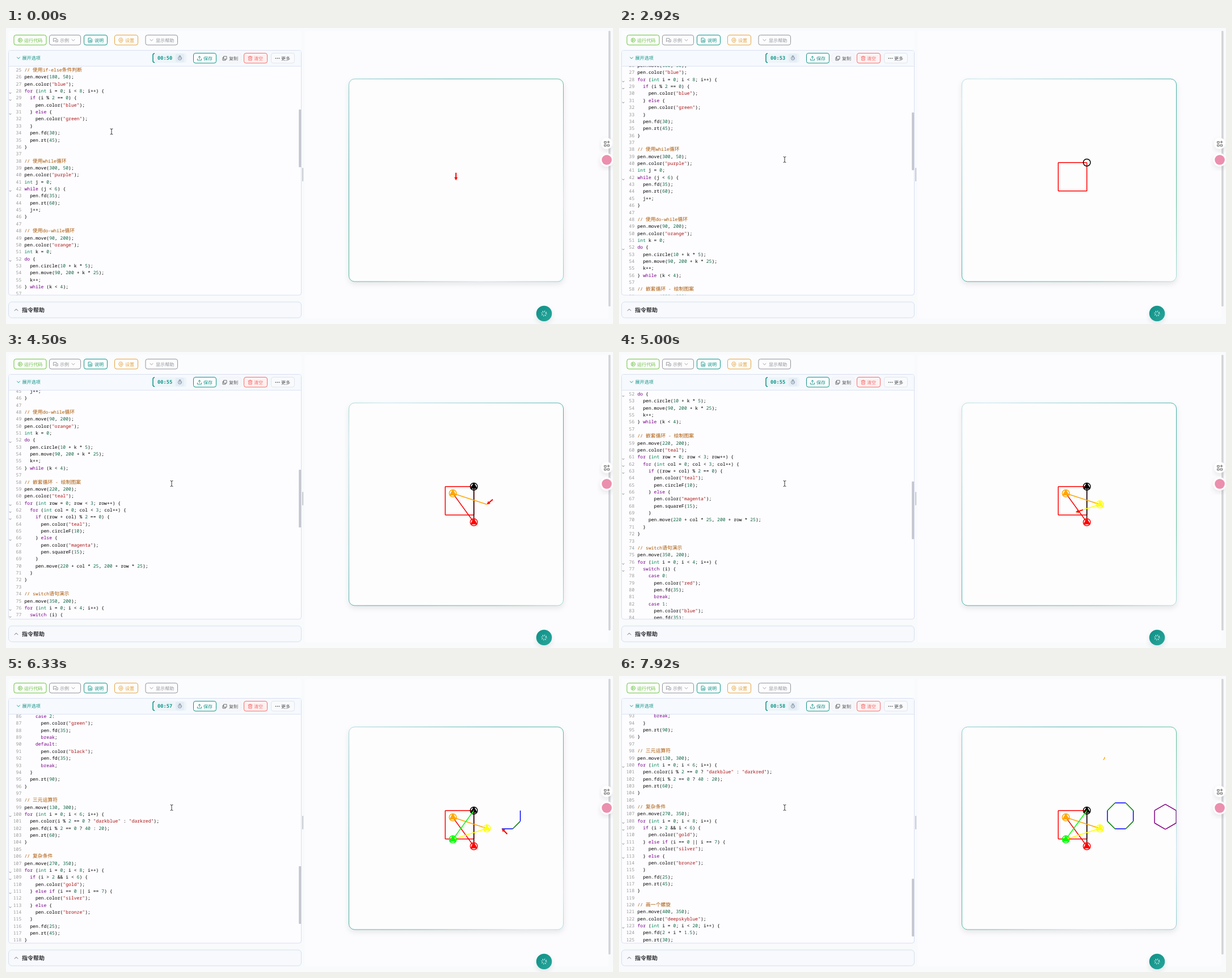
These frames come from a looping animation (1070 px wide and 523 px high, 8000 ms). An HTML page:

```html
<!DOCTYPE html>
<html lang="zh-CN">
<head>
<meta charset="utf-8">
<style>
html, body { margin: 0; height: 100%; overflow: hidden; background: #f8fafc; }
svg { display: block; font: 500 8.1px "Noto Sans CJK SC", "Noto Sans CJK", sans-serif; text-rendering: geometricPrecision; }
.code text { font: 8.08px "Noto Sans Mono", monospace; white-space: pre; }
.code .cjk { font: 8.8px "Noto Sans CJK SC", "Noto Sans CJK", sans-serif; }
.comment { fill: #a50; } .string { fill: #a11; } .keyword { fill: #708; } .type { fill: #085; } .number { fill: #164; }
.icon { fill: none; stroke-width: .9; stroke-linecap: round; stroke-linejoin: round; }
</style>
</head>
<body>
<script>
const LOOP = 8000, LINE = 12.355, FIRST = 25;
const TEAL = '#0d9488', GREEN = '#67c23a', GREY = '#909399';

const source = `// 使用if-else条件判断
pen.move(180, 50);
pen.color("blue");
for (int i = 0; i < 8; i++) {
  if (i % 2 == 0) {
    pen.color("blue");
  } else {
    pen.color("green");
  }
  pen.fd(30);
  pen.rt(45);
}

// 使用while循环
pen.move(300, 50);
pen.color("purple");
int j = 0;
while (j < 6) {
  pen.fd(35);
  pen.rt(60);
  j++;
}

// 使用do-while循环
pen.move(90, 200);
pen.color("orange");
int k = 0;
do {
  pen.circle(10 + k * 5);
  pen.move(90, 200 + k * 25);
  k++;
} while (k < 4);

// 嵌套循环 - 绘制图案
pen.move(220, 200);
pen.color("teal");
for (int row = 0; row < 3; row++) {
  for (int col = 0; col < 3; col++) {
    if ((row + col) % 2 == 0) {
      pen.color("teal");
      pen.circleF(10);
    } else {
      pen.color("magenta");
      pen.squareF(15);
    }
    pen.move(220 + col * 25, 200 + row * 25);
  }
}

// switch语句演示
pen.move(350, 200);
for (int i = 0; i < 4; i++) {
  switch (i) {
    case 0:
      pen.color("red");
      pen.fd(35);
      break;
    case 1:
      pen.color("blue");
      pen.fd(35);
      break;
    case 2:
      pen.color("green");
      pen.fd(35);
      break;
    default:
      pen.color("black");
      pen.fd(35);
      break;
  }
  pen.rt(90);
}

// 三元运算符
pen.move(130, 300);
for (int i = 0; i < 6; i++) {
  pen.color(i % 2 == 0 ? "darkblue" : "darkred");
  pen.fd(i % 2 == 0 ? 40 : 20);
  pen.rt(60);
}

// 复杂条件
pen.move(270, 350);
for (int i = 0; i < 8; i++) {
  if (i > 2 && i < 6) {
    pen.color("gold");
  } else if (i == 0 || i == 7) {
    pen.color("silver");
  } else {
    pen.color("bronze");
  }
  pen.fd(25);
  pen.rt(45);
}

// 画一个螺旋
pen.move(400, 350);
pen.color("deepskyblue");
for (int i = 0; i < 20; i++) {
  pen.fd(2 + i * 1.5);
  pen.rt(30);
}

`.split('\n');

const escapeXml = s => s.replace(/&/g, '&amp;').replace(/</g, '&lt;');
const TOKEN = /(?<comment>\/\/.*)|(?<string>"[^"]*")|(?<keyword>\b(?:for|if|else|while|do|switch|case|break|default)\b)|(?<type>\bint\b)|(?<number>\d+(?:\.\d+)?)/g;
const highlight = line => escapeXml(line).replace(TOKEN, (token, ...rest) => {
  const groups = rest.at(-1);
  const kind = Object.keys(groups).find(name => groups[name]);
  const body = token.replace(/[\u4e00-\u9fff]+/g, run => `<tspan class="cjk">${run}</tspan>`);
  return `<tspan class="${kind}">${body}</tspan>`;
});

const DOWN = 'M-2.5-1.2L0 1.2 2.5-1.2';
const CIRCLE = r => `M${r} 0A${r} ${r} 0 1 1-${r} 0A${r} ${r} 0 1 1 ${r} 0z`;
const ICON = {
  play: CIRCLE(3.6) + 'M-1-1.6L1.7 0-1 1.6z',
  chat: 'M-3.6-3.2h5v4.2h-3l-2 1.3zM3-1h.8v4h-4.2',
  doc: 'M-3-3.6h4l2 2v5.2h-6zM-1.4 0h2.8M-1.4 1.8h2.8',
  gear: 'M-1.7-3.6h3.4L3.7 0 1.7 3.6h-3.4L-3.7 0z' + CIRCLE(1.3),
  upload: 'M0 1V-3.5M-2-1.6L0-3.6 2-1.6M-3.6 1v2.4h7.2V1',
  copy: 'M-1.5-3.4h5v5h-5zM-1.5-1.4h-2v5h5v-2',
  trash: 'M-3.5-2.4h7M-1.2-2.4v-1.2h2.4v1.2M-2.7-2.4v6h5.4v-6M-.9-.4v2M.9-.4v2',
  watch: CIRCLE(3) + 'M0-1.3V.4M-1.2-4.2h2.4',
};
const icon = (d, x, y, color, extra = '') =>
  `<path class="icon" d="${d}" transform="translate(${x} ${y})" stroke="${color}" ${extra}/>`;
const label = (s, x, y, color, extra = '') => `<text x="${x}" y="${y}" fill="${color}" ${extra}>${s}</text>`;
const box = (x, y, w, h, r, fill, stroke = 'none', extra = '') =>
  `<rect x="${x}" y="${y}" width="${w}" height="${h}" rx="${r}" fill="${fill}" stroke="${stroke}" ${extra}/>`;
const button = (x, y, w, color, glyph, iconX, text, textX, fill = '#fdfdfe', border = color) =>
  box(x, y, w, 17.5, 3.5, fill, border) + icon(glyph, iconX, y + 9, color) + label(text, textX, y + 12, color);

const codeRows = source.map((line, i) => {
  const y = 77 + i * LINE;
  return label(i + FIRST, 27.3, y, '#999', 'text-anchor="end"')
    + `<text x="32.5" y="${y}">${highlight(line)}</text>`
    + (line.endsWith('{') ? icon('M-1.5-.8L0 .8 1.5-.8', 7.5, y + 1, '#777', 'stroke-width=".7"') : '');
}).join('');

document.body.innerHTML = `
<svg width="1070" height="523" viewBox="0 0 1070 523">
<defs>
  <clipPath id="editorClip"><rect x="5" y="67.5" width="511" height="404"/></clipPath>
  <clipPath id="boardClip"><rect x="604.5" y="90" width="378" height="358" rx="10"/></clipPath>
  <linearGradient id="edge" gradientUnits="userSpaceOnUse" x1="604" y1="90" x2="972" y2="458" spreadMethod="repeat">
    <stop stop-color="#c5e6ee"/><stop offset=".45" stop-color="#45b0a8"/>
    <stop offset=".75" stop-color="#5fc09a"/><stop offset="1" stop-color="#c5e6ee"/>
  </linearGradient>
  <linearGradient id="fab" x1="0" y1="0" x2="1" y2="1"><stop stop-color="#0d8f86"/><stop offset="1" stop-color="#2aa79b"/></linearGradient>
  <filter id="soft" x="-20%" y="-20%" width="140%" height="150%"><feDropShadow dx="0" dy="4" stdDeviation="5" flood-opacity=".09"/></filter>
</defs>
${box(4.5, 4.5, 516, 35, 5, '#fbfcfe')}
${box(526, 5, 536, 508, 4, '#fcfcfe')}
${box(4.5, 39.5, 516, 432.5, 4, '#fdfdff', '#d9def0')}
${box(5, 40, 515, 27, 3, '#f6f9fd')}
<path d="M5 67.5h515" stroke="#dde2f2"/>
<g id="run">${button(14, 12.5, 57, GREEN, ICON.play, 25, '运行代码', 32)}</g>
<g id="runHover">${button(14, 12.5, 57, '#fff', ICON.play, 25, '运行代码', 32, GREEN, GREEN)}</g>
${button(76.5, 12.5, 55, GREY, ICON.chat, 87.5, '示例', 95)}${icon(DOWN, 118.5, 21.5, GREY)}
${button(137.5, 12.5, 41, TEAL, ICON.doc, 148.5, '说明', 156)}
${button(191.5, 12.5, 41, '#e6a23c', ICON.gear, 202.5, '设置', 210)}
${button(246, 12.5, 56.5, GREY, DOWN, 256.5, '显示帮助', 264)}
${icon(DOWN, 22, 53, TEAL)}${label('展开选项', 28.5, 56, TEAL)}
${box(258, 44.5, 60, 17, 4, '#edf5f9')}
<path d="M262 45q-3 0-3 3v10q0 3 3 3" fill="none" stroke="${TEAL}" stroke-width="1.5"/>
${box(299, 45.5, 15, 15, 3, '#e4edf5')}${icon(ICON.watch, 306.5, 53.5, '#66788a')}
<text id="clock" x="267" y="56.2" fill="${TEAL}" style="font:bold 8.7px 'DejaVu Sans Mono',monospace"></text>
${button(330.5, 44.5, 40, TEAL, ICON.upload, 341, '保存', 348)}
${button(375.5, 44.5, 39, '#606266', ICON.copy, 385.5, '复制', 393, '#f6f7fa', '#f1f2f6')}
${button(419.5, 44.5, 41, '#f56c6c', ICON.trash, 430.5, '清空', 437, '#fef1f1')}
${button(467.5, 44.5, 41, '#55575c', '', 478, '更多', 485, '#f9fafc', '#e2e4ea')}
${icon('M-3 0h.01M0 0h.01M3 0h.01', 478.5, 53.5, '#444', 'style="stroke-width:1.7"')}
<g class="code" clip-path="url(#editorClip)"><g id="code">${codeRows}</g></g>
<rect id="thumb" x="516.2" width="3.8" height="102" rx="1" fill="#c4c7d0"/>
${box(4.5, 484, 516, 28, 6, '#f7f9fd', '#d5e0ee')}
${icon('M-2.8 1.4L0-1.4 2.8 1.4', 18, 498, '#555')}
${label('指令帮助', 28, 501.6, '#303133', 'font-size="10" font-weight="700"')}
${box(522, 247, 2.2, 24, 1, '#c9ccd3')}
${box(1062, 5, 3.6, 487, 1.5, '#d2d4d8')}
${box(604.5, 90, 378, 358, 10, '#fdfdfe', 'url(#edge)', 'filter="url(#soft)"')}
<g clip-path="url(#boardClip)"><g id="drawing" fill="none" stroke-width="1.5"></g>
  <g id="turtle" fill="red"><path d="M-13.5-1h8v-2L0 0l-5.5 3V1h-8z"/></g></g>
<circle cx="1059" cy="204" r="10" fill="#fff" filter="url(#soft)"/>
${icon('M-4-4h3v3h-3zM-4 1.5h3v3h-3zM1.5 1.5h3v3h-3zM3-5v4M1-3h4', 1059, 204.5, '#555')}
<circle cx="1059" cy="233" r="11.5" fill="#fff" filter="url(#soft)"/><circle cx="1059" cy="233" r="8.8" fill="#eb8fae"/>
<circle cx="948.5" cy="504.5" r="13.8" fill="url(#fab)" filter="url(#soft)"/>
<circle cx="948.5" cy="504.5" r="3.7" fill="none" stroke="#fff" stroke-width="2.8" stroke-dasharray=".9 2.006"/>
<g id="beam"><path class="icon" d="M-2-5q2 0 2 1.2 0-1.2 2-1.2M0-4v8M-2 5q2 0 2-1.2 0 1.2 2 1.2" stroke="#222"/></g>
<g id="hand"><path d="M-2.2-6q1.1-1.4 2.2 0v4.3l4.3.9q1.4.4 1.3 2L4.8 5v1.8h-5.6V5.2L-4.6.7q.3-1.6 1.6-.8l.8.8z" fill="#fff" stroke="#111" stroke-linejoin="round"/></g>
</svg>`;

const el = id => document.getElementById(id);
const clamp = v => Math.min(1, Math.max(0, v));
const place = (id, x, y, angle = 0) => el(id).setAttribute('transform', `translate(${x} ${y}) rotate(${angle})`);
const show = (node, on) => node.setAttribute('visibility', on ? 'visible' : 'hidden');

// Turtle program: each step has a cost, and the drawing advances along the total cost.
const SCALE = .63, HOME = { x: 793.2, y: 269.2 };
const steps = [];
let pen = { ...HOME, angle: 90, color: 'red' }, total = 0;

function step(cost, shape, next = {}) {
  const s = { start: total, cost, from: pen, to: { ...pen, ...next }, moving: !!(next.x || next.angle) };
  if (shape) {
    el('drawing').insertAdjacentHTML('beforeend', `<${shape} stroke="${pen.color}" pathLength="1"/>`);
    s.node = el('drawing').lastChild;
    s.solid = shape.includes('fill=');
  }
  steps.push(s);
  total += cost;
  pen = s.to;
}
const move = (x, y) => { pen = { ...pen, x: HOME.x + x * SCALE, y: HOME.y - y * SCALE }; };
const color = c => { pen = { ...pen, color: c }; };
function fd(d) {
  const a = pen.angle * Math.PI / 180;
  const x = pen.x + d * SCALE * Math.cos(a), y = pen.y + d * SCALE * Math.sin(a);
  step(d, `path d="M${pen.x} ${pen.y}L${x} ${y}"`, { x, y });
}
const rt = deg => step(deg * .6, null, { angle: pen.angle + deg });
const circle = r => step(r * 8, `circle cx="${pen.x}" cy="${pen.y}" r="${r * SCALE}"`);
const triangle = () => step(30, `path d="M${pen.x} ${pen.y - 5.8}l5 8.8h-10z" fill="${pen.color}"`);

move(50, 50);
for (let i = 0; i < 4; i++) { fd(80); rt(90); }
for (const c of ['black', 'red', 'orange', 'yellow', 'lime']) { color(c); circle(10); triangle(); fd(100); rt(144); }
move(180, 50);
for (let i = 0; i < 8; i++) { color(i % 2 ? 'green' : 'blue'); fd(30); rt(45); }
move(300, 50);
color('purple');
for (let i = 0; i < 6; i++) { fd(35); rt(60); }
move(90, 200);
color('orange');
circle(10);

const progress = [[1540, 0], [1830, 134.3], [3500, 915], [4500, 1412], [5670, 1865.6], [6330, 2189.3], [7920, 2911], [8000, 2948]];
const wheelTicks = [2900, 4050, 4900, 5250, 5850, 6050, 7810];

function interpolate(points, t) {
  const i = Math.max(1, points.findIndex(p => p[0] >= t));
  const [t0, v0] = points[i - 1], [t1, v1] = points[i];
  return v0 + (v1 - v0) * (t - t0) / (t1 - t0);
}

function drawTurtle(t) {
  const cost = t < progress[0][0] ? -1 : interpolate(progress, t);
  let pose = { ...HOME, angle: 90 }, visible = true;
  for (const { start, cost: length, from, to, moving, node, solid } of steps) {
    const p = clamp((cost - start) / length);
    if (node) {
      show(node, solid ? p === 1 : p > 0);
      if (!solid) node.setAttribute('stroke-dasharray', p < 1 ? `${p} 2` : 'none');
    }
    if (cost < start) continue;
    const mix = key => from[key] + (to[key] - from[key]) * p;
    pose = { x: mix('x'), y: mix('y'), angle: mix('angle') };
    visible = moving;
  }
  place('turtle', pose.x, pose.y, pose.angle);
  show(el('turtle'), visible);
}

function drawCursor(t) {
  const ease = (a, b) => { const p = clamp((t - a) / (b - a)); return p * p * (3 - 2 * p); };
  const toButton = ease(150, 700), toCode = ease(2000, 2480);
  const x = 186 - 131 * toButton + 237 * toCode, y = 183 - 154 * toButton + 203.5 * toCode;
  const overButton = x > 14 && x < 71 && y < 34;
  show(el('run'), !overButton);
  show(el('runHover'), overButton);
  show(el('beam'), y >= 67);
  show(el('hand'), y < 67);
  place('beam', x, y);
  place('hand', x, y);
}

function render(now) {
  const t = now % LOOP;
  const scroll = wheelTicks.reduce((sum, start) => sum + 126.1 * (1 - (1 - clamp((t - start) / 250)) ** 2), 0);
  place('code', 0, -scroll);
  el('thumb').setAttribute('y', 144 + scroll * .2538);
  el('clock').textContent = '00:' + Math.floor(50.83 + t / 1000);
  const shift = 368 * (.05 + .15 * Math.cos(t / LOOP * 2 * Math.PI));
  el('edge').setAttribute('gradientTransform', `translate(${-shift} ${-shift})`);
  drawTurtle(t);
  drawCursor(t);
  requestAnimationFrame(render);
}
requestAnimationFrame(render);
</script>
</body>
</html>
```
